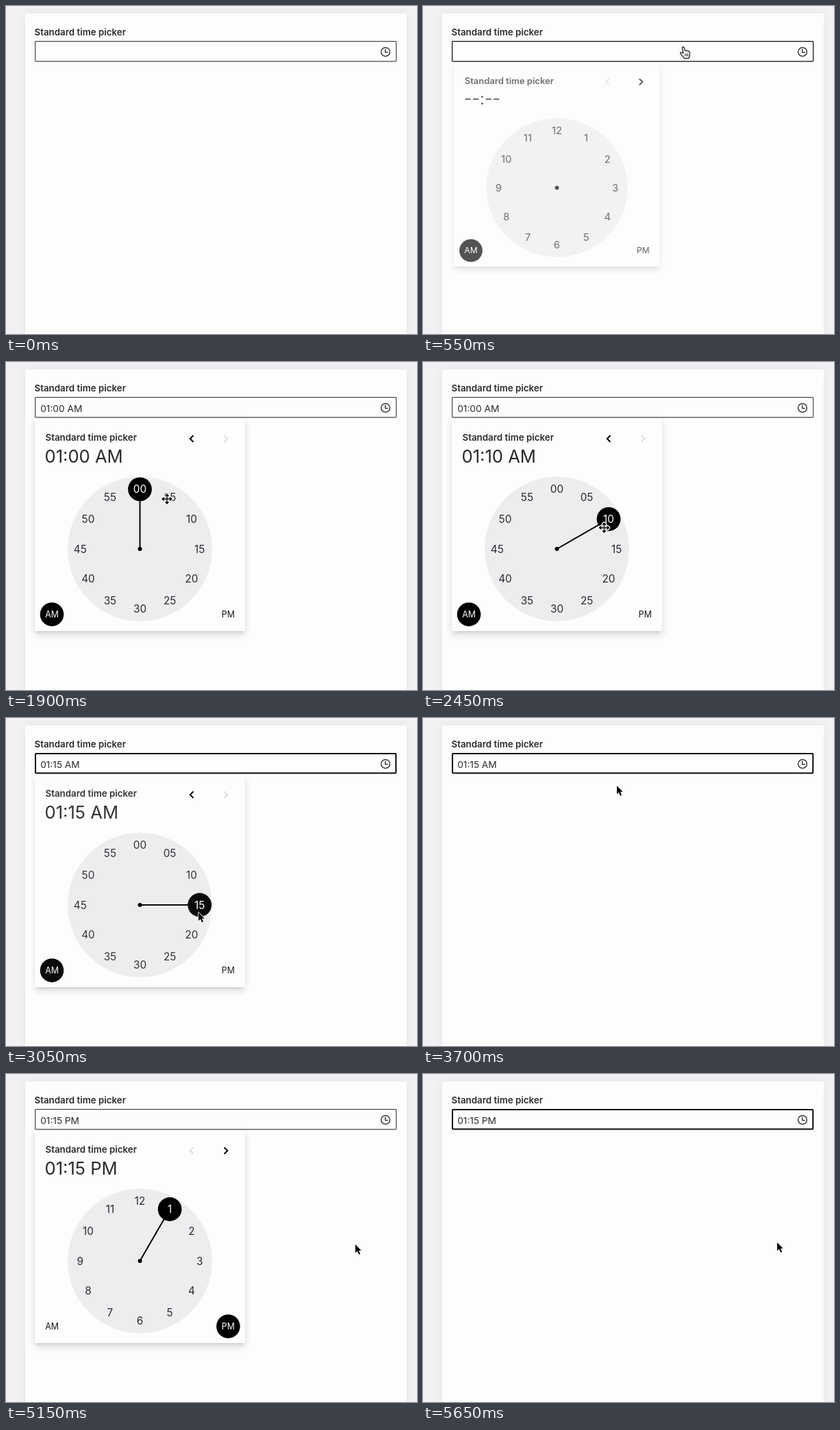
An HTML page for the animation above (5.7 s loop, 600 px wide and 479 px high).

```html
<!DOCTYPE html>
<html lang="en">
<head>
<meta charset="utf-8">
<title>Standard time picker</title>
<style>
  html, body { margin: 0; width: 100%; height: 100%; overflow: hidden; background: #f2f1f4; }
  body { position: relative; font-family: Inter, sans-serif; }
  .card {
    position: absolute; left: 28px; top: 11px; width: 557px; height: 520px;
    background: #fefdfe; box-shadow: 0 0 14px rgba(0, 0, 0, .06);
  }
  svg { position: absolute; left: 0; top: 0; overflow: visible; }
  #popup {
    position: absolute; left: 0; top: 0; width: 600px; height: 479px;
    transform-origin: 195.5px 83px;
  }
  .paper {
    position: absolute; left: 42px; top: 83px; width: 307px; height: 310px;
    border-radius: 2px; background: #fefdfe;
    box-shadow: 0 4px 5px -3px rgba(0, 0, 0, .16), 0 7px 10px 1px rgba(0, 0, 0, .06),
      0 3px 13px 2px rgba(0, 0, 0, .06);
  }
  text { fill: #2a292d; }
  .title { font-size: 13.35px; font-weight: 600; }
  #value { font-size: 13.7px; }
  #header { font-size: 25.6px; }
  .num { font-size: 15.3px; text-anchor: middle; }
  .half { font-size: 12.4px; text-anchor: middle; }
  .chevron { fill: none; stroke-width: 2; }
</style>
</head>
<body>
<div class="card"></div>
<svg width="600" height="479">
  <text class="title" x="41.5" y="43">Standard time picker</text>
  <rect id="field" fill="#fefdfe" rx="1"/>
  <text id="value" x="50.2" y="73"></text>
  <g fill="none" stroke="#1c1c1f" stroke-width="1.25">
    <circle cx="554" cy="67" r="6.4"/>
    <path d="M553.7 62.8V67.6H557.6"/>
  </g>
</svg>
<div id="popup">
  <div class="paper"></div>
  <svg width="600" height="479" id="face">
    <text class="title" x="57.5" y="115">Standard time picker</text>
    <text id="header" x="56.5" y="147"></text>
    <path id="back" class="chevron" d="M273.5 107.3L268.8 112L273.5 116.7"/>
    <path id="next" class="chevron" d="M318.6 107.3L323.3 112L318.6 116.7"/>
    <circle cx="195.5" cy="273" r="105.5" fill="#ededef"/>
  </svg>
</div>
<svg width="600" height="479" id="pointer"></svg>
<script>
const LOOP = 5700, STEP = 50;
const CX = 195.5, CY = 273, RING = 87.2;
const $ = id => document.getElementById(id);

function add(parent, tag, attrs, text) {
  const node = document.createElementNS('http://www.w3.org/2000/svg', tag);
  set(node, attrs);
  if (text) node.textContent = text;
  return parent.appendChild(node);
}
function set(node, attrs) {
  for (const key in attrs) node.setAttribute(key, attrs[key]);
}

const clamp = v => Math.min(1, Math.max(0, v));
const mix = (a, b, k) => a + (b - a) * k;
const smooth = k => k * k * (3 - 2 * k);

// cubic-bezier(.4, 0, .2, 1)
function standardEase(x) {
  if (x <= 0 || x >= 1) return clamp(x);
  let lo = 0, hi = 1;
  for (let i = 0; i < 20; i++) {
    const s = (lo + hi) / 2, r = 1 - s;
    if (1.2 * r * r * s + .6 * r * s * s + s ** 3 < x) lo = s; else hi = s;
  }
  return lo * lo * (3 - 2 * lo);
}

// Rows are [time, value, ...]; returns the current row, the next one and the share between
function span(rows, t) {
  let i = 0;
  while (i < rows.length - 1 && rows[i + 1][0] <= t) i++;
  const a = rows[i], b = rows[i + 1] || a;
  return [a, b, b === a ? 0 : clamp((t - a[0]) / (b[0] - a[0]))];
}

const onRing = turn => [CX + RING * Math.sin(turn * 2 * Math.PI), CY - RING * Math.cos(turn * 2 * Math.PI)];

function makeView(label) {
  const group = add($('face'), 'g', {});
  const hand = add(group, 'line', { x1: CX, y1: CY, stroke: '#000', 'stroke-width': 2 });
  const knob = add(group, 'circle', { r: 17.4 });
  const labels = Array.from({ length: 12 }, (_, i) => {
    const [x, y] = onRing(i / 12);
    return add(group, 'text', { class: 'num', x, y: y + 5.6 }, label(i));
  });
  return (opacity, turn) => {
    const picked = turn !== null;
    set(group, { opacity });
    hand.style.display = knob.style.display = picked ? '' : 'none';
    if (picked) {
      const [x, y] = onRing(turn);
      set(hand, { x2: x, y2: y });
      set(knob, { cx: x, cy: y });
    }
    labels.forEach((node, i) => {
      node.style.fill = picked && Math.abs(turn * 12 - i) < .01 ? '#fff' : '';
    });
  };
}
const hours = makeView(i => String(i || 12));
const minutes = makeView(i => String(i * 5).padStart(2, '0'));
add($('face'), 'circle', { cx: CX, cy: CY, r: 3 });

function makeHalf(name, x) {
  const disc = add($('face'), 'circle', { cx: x, cy: 368.6, r: 17.3 });
  const text = add($('face'), 'text', { class: 'half', x, y: 373.1 }, name);
  return (active, hover) => {
    set(disc, { fill: active ? '#000' : hover ? '#f3f2f4' : 'none' });
    text.style.fill = active ? '#fff' : '#151517';
  };
}
const am = makeHalf('AM', 67), pm = makeHalf('PM', 324.4);

const outline = { 'stroke-linejoin': 'round', 'stroke-linecap': 'round' };
const cursors = {
  arrow: add($('pointer'), 'g', outline),
  hand: add($('pointer'), 'g', outline),
  move: add($('pointer'), 'g', outline)
};
add(cursors.arrow, 'path', {
  d: 'M0 0V12.2L2.8 9.6L5 14.6L7.1 13.7L5 8.8H8.7Z',
  fill: '#000', stroke: '#fff', 'stroke-width': 1.6, 'paint-order': 'stroke'
});
add(cursors.hand, 'path', {
  d: 'M-1.7 1.4Q-.6 -.8 1 1L2.6 6Q4 4.4 5 6.2Q6.5 5 7.4 6.8Q9 6.2 9.2 8L9.4 12.5L8 16.8H1.6L-3.6 10.8Q-5.4 8.2 -3 8L0 9.4Z',
  fill: '#fff', stroke: '#111', 'stroke-width': 1.2
});
add(cursors.hand, 'path', {
  d: 'M2.7 10.5V13.6M4.7 10.3V13.6M6.7 10.2V13.5', stroke: '#111', 'stroke-width': .9
});
const moveShape = 'M-6 0H6M0 -6V6M-2 -4.8L0 -7L2 -4.8ZM-2 4.8L0 7L2 4.8ZM-4.8 -2L-7 0L-4.8 2ZM4.8 -2L7 0L4.8 2Z';
for (const [stroke, width] of [['#fff', 4], ['#111', 1.5]])
  add(cursors.move, 'path', { d: moveShape, fill: stroke, stroke, 'stroke-width': width });

const track = [
  [50, 470, 205, 'arrow'], [300, 390, 78, 'hand'], [400, 380, 59.5, 'hand'], [600, 380, 59.5, 'hand'],
  [700, 362, 84, 'arrow'], [1000, 270, 165, 'hand'], [1250, 239.5, 192.5, 'hand'], [1550, 240, 195, 'hand'],
  [1800, 252, 209, 'hand'], [1900, 235, 200, 'move'], [2000, 211, 192, 'move'], [2150, 211, 192, 'move'],
  [2300, 247, 212, 'move'], [2450, 264.5, 242, 'move'], [2650, 280, 291, 'move'], [2700, 280, 291, 'move'],
  [2850, 281, 284, 'move'], [3050, 281, 284, 'arrow'], [3450, 281, 284, 'arrow'], [3700, 283, 99, 'arrow'],
  [3800, 284, 72, 'hand'], [3900, 284, 60, 'hand'], [4050, 284, 60, 'hand'], [4150, 288, 100, 'arrow'],
  [4450, 322, 350, 'hand'], [4600, 326, 372.5, 'hand'], [4800, 326, 372.5, 'hand'], [4900, 365, 345, 'arrow'],
  [5150, 510, 249, 'arrow'], [5600, 510, 249, 'arrow'], [5650, 517, 246, 'arrow']
];
const minuteTrack = [[2150, 0], [2450, 10], [2650, 16], [2700, 16], [2850, 15]];
const visits = [[415, 3010], [3985, 5255]];
const FADE = 314, GROW = 209;

function drawPopup(t) {
  const [open, close] = visits[t < visits[1][0] ? 0 : 1];
  const closing = t >= close;
  const alpha = standardEase((closing ? t - close : t - open) / FADE);
  const grow = standardEase((closing ? t - close - FADE / 3 : t - open) / GROW);
  const size = closing ? 1 - grow : grow;
  $('popup').style.opacity = closing ? 1 - alpha : alpha;
  $('popup').style.transform = `scale(${mix(.75, 1, size)}, ${mix(.5625, 1, size)})`;
}

function drawCursor(t) {
  const [a, b, k] = span(track, t);
  const e = smooth(k);
  for (const name in cursors) cursors[name].style.display = t >= 50 && name === a[3] ? '' : 'none';
  set($('pointer'), { transform: '' });
  set(cursors[a[3]], { transform: `translate(${mix(a[1], b[1], e)} ${mix(a[2], b[2], e)})` });
}

function render(t) {
  const picked = t >= 1350;
  const [a, b, k] = span(minuteTrack, t);
  const minute = Math.round(mix(a[1], b[1], k));
  const evening = t >= 4750;
  const half = evening ? 'PM' : 'AM';
  const time = m => `01:${String(m).padStart(2, '0')} ${half}`;

  $('value').textContent = picked ? time(t < 3050 ? 0 : minute) : '';
  $('header').textContent = picked ? time(minute) : '--:--';

  const focus = (t >= 3050 && t < 4000) || t >= 5300;
  const hover = t >= 300 && t < 700;
  const w = focus ? 2 : 1.2;
  set($('field'), {
    x: 42 + w / 2, y: 51 + w / 2, width: 528.3 - w, height: 30.4 - w,
    'stroke-width': w, stroke: focus || hover ? '#0b0b0d' : '#48474c'
  });

  const minuteView = t < 3600 ? clamp((t - 1500) / 250) : 0;
  hours(1 - minuteView, picked ? 1 / 12 : null);
  minutes(minuteView, minute / 60);
  const onMinutes = minuteView > 0;
  set($('back'), { stroke: onMinutes ? '#000' : '#dddce0' });
  set($('next'), { stroke: onMinutes ? '#dddce0' : '#000' });
  am(!evening, false);
  pm(evening, t >= 4500);

  drawPopup(t);
  drawCursor(t);
}

const start = performance.now();
function tick() {
  const t = (performance.now() - start) % LOOP;
  render(Math.floor(t / STEP) * STEP);
  requestAnimationFrame(tick);
}
tick();
</script>
</body>
</html>
```
